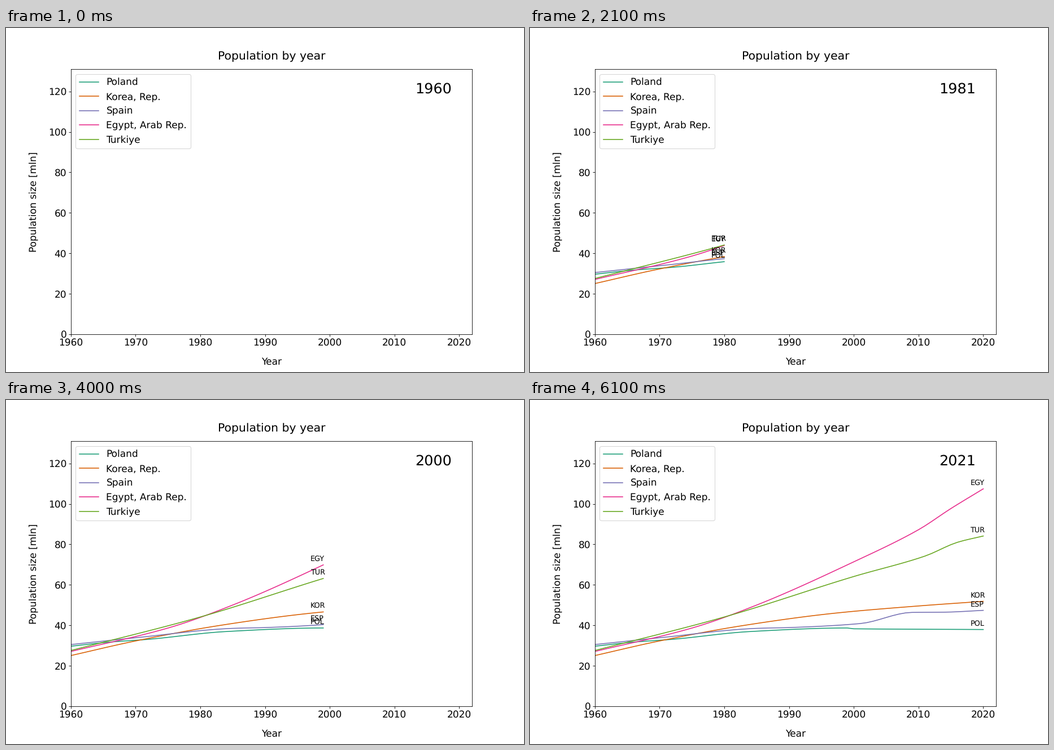
A matplotlib script for the animation above (6.2 s loop, 917 by 611 pixels).

```python
import numpy as np
import matplotlib.pyplot as plt
from matplotlib.animation import FuncAnimation

W, H, DPI = 917, 611, 76.4
START, END = 1960, 2022
FRAMES = END - START

plt.rcParams.update({
    "font.family": "DejaVu Sans",
    "font.size": 16,
    "text.hinting": "none",
})

years = np.arange(START, END)


def smooth(keys):
    """Cubic Hermite curve through a few (year: millions) turning points."""
    x, y = np.array(list(keys)), np.array(list(keys.values()))
    step = np.diff(x)
    rate = np.diff(y) / step
    # Harmonic-mean slopes keep the bends tight, without overshoot.
    a, b = rate[:-1], rate[1:]
    slope = np.r_[rate[0], np.where(a * b > 0, 2 * a * b / (a + b), 0), rate[-1]]

    k = np.clip(np.searchsorted(x, years, side="right") - 1, 0, len(step) - 1)
    h = step[k]
    t = np.clip((years - x[k]) / h, 0, 1)
    blend = t * t * (3 - 2 * t)
    bend = t * (1 - t) * ((1 - t) * slope[k] - t * slope[k + 1])
    return y[k] + (y[k + 1] - y[k]) * blend + h * bend


countries = [
    ("Poland", "POL", smooth({
        1960: 29.64, 1966: 31.68, 1972: 33.06, 1984: 36.9,
        1999: 38.66, 2000: 38.26, 2020: 37.9})),
    ("Korea, Rep.", "KOR", smooth({
        1960: 25.01, 1970: 32.24, 1983: 39.91, 1997: 45.95,
        2010: 49.55, 2020: 51.84})),
    ("Spain", "ESP", smooth({
        1960: 30.46, 1970: 33.82, 1985: 38.47, 1990: 38.87,
        2001: 40.85, 2009: 46.36, 2014: 46.48, 2020: 47.37})),
    ("Egypt, Arab Rep.", "EGY", smooth({
        1960: 27.03, 1975: 38.62, 1985: 49.99, 2000: 71.37,
        2010: 87.25, 2015: 97.72, 2020: 107.47})),
    ("Turkiye", "TUR", smooth({
        1960: 27.51, 1980: 44.09, 2000: 64.11, 2011: 74.22,
        2016: 81.02, 2020: 84.14})),
]

# The small margin keeps the pixel size from being rounded down.
fig, ax = plt.subplots(figsize=((W + 0.01) / DPI, (H + 0.01) / DPI), dpi=DPI)
ax.set_xlim(START, END)
ax.set_ylim(0, 130.99)
ax.set_title("Population by year", pad=16)
ax.set_xlabel("Year", labelpad=16)
ax.set_ylabel("Population size [mln]", labelpad=16)

lines, tags = [], []
for k, (name, code, _) in enumerate(countries):
    lines += ax.plot([], [], color=plt.cm.Dark2(k), lw=1.5, label=name)
    tags.append(ax.annotate(code, (START - 2, 0), fontsize=12))
ax.legend(loc="upper left", labelspacing=0.54)
clock = ax.text(0.858, 0.91, str(START), fontsize=24, transform=ax.transAxes)


def update(i):
    last = max(i - 1, 0)
    for line, tag, (_, _, values) in zip(lines, tags, countries):
        line.set_data(years[:i], values[:i])
        # Tags left of the axes stay hidden by annotation clipping.
        tag.xy = tag.xyann = (years[last] - 2, values[last] + 2)
    clock.set_text(str(START + i))
    return [*lines, *tags, clock]


anim = FuncAnimation(fig, update, frames=FRAMES, interval=100, repeat=True, repeat_delay=0)
plt.show()
```
